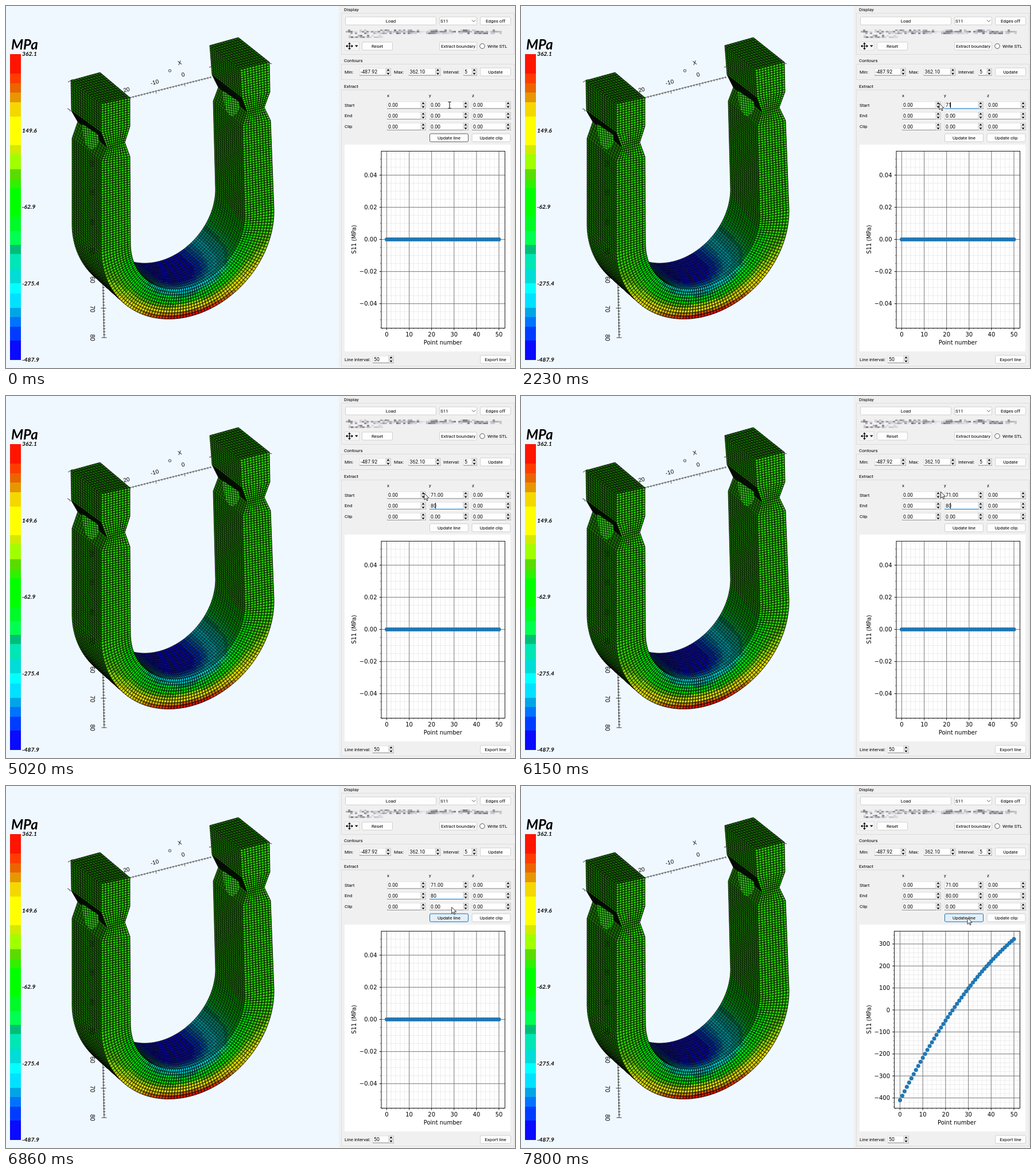
These frames come from a looping animation (887x632 px, 8 s). An HTML page with a canvas:

```html
<!DOCTYPE html>
<html lang="en">
<head>
<meta charset="utf-8">
<title>Stress viewer</title>
<style>
html, body { margin: 0; width: 100%; height: 100%; overflow: hidden; background: #f0f0f0; }
canvas, svg { position: absolute; left: 0; top: 0; width: 887px; height: 632px; }
text { white-space: pre; }
</style>
</head>
<body>
<canvas id="model" width="887" height="632"></canvas>
<svg id="ui" viewBox="0 0 887 632"></svg>
<script>
const LOOP = 8000;
const UI_FONT = 'Roboto, sans-serif';
const PLOT_FONT = '"DejaVu Sans", sans-serif';
const AXIS_FONT = '"Liberation Sans", sans-serif';
const BAR_FONT = 'Lato, sans-serif';

// Colour bar: bottom edge and colour of each band
const BAR_TOP = 84;
const BANDS = [
  [118, '#ff1400'], [135, '#ff3c00'], [151, '#eb6400'], [168, '#e69600'], [193, '#f5d700'],
  [243, '#ffff00'], [259, '#d2eb00'], [285, '#a0ff00'], [302, '#5adc00'], [318, '#32f000'],
  [368, '#00ff00'], [393, '#00fa28'], [417, '#00ff50'], [433, '#00be78'], [459, '#00e6b4'],
  [484, '#00dcd7'], [502, '#00ffff'], [527, '#00e1ff'], [543, '#00a5e6'], [560, '#0073ff'],
  [584, '#003cff'], [618, '#0a0aff']
];

/* ---------- 3D model ---------- */
const ctx = document.getElementById('model').getContext('2d');
const mix = (a, b, k) => a.map((v, i) => v + (b[i] - v) * k);

function stressColor(mpa, shade) {
  const y = BAR_TOP + (362 - mpa) / 850 * 534;
  const hex = (BANDS.find(b => y <= b[0]) || BANDS[BANDS.length - 1])[1];
  const rgb = [1, 3, 5].map(k => Math.round(parseInt(hex.substr(k, 2), 16) * shade));
  return `rgb(${rgb})`;
}

const LEG_ROWS = [12, 7, 6, 38], ARC_ROWS = 88;
const LEG = LEG_ROWS.reduce((a, b) => a + b);
const TOTAL = 2 * LEG + ARC_ROWS;

const divide = (pts, counts) => counts.flatMap((n, s) =>
  Array.from({ length: n }, (_, i) => mix(pts[s], pts[s + 1], i / n)));

// An edge of the U: down the left leg, round the bend, up the right leg
function rail(left, [cx, cy], [ux, uy], [vx, vy], right) {
  const bend = Array.from({ length: ARC_ROWS }, (_, i) => {
    const a = Math.PI * i / ARC_ROWS, c = Math.cos(a), s = Math.sin(a);
    return [cx - ux * c + vx * s, cy - uy * c + vy * s];
  });
  return [...divide(left, LEG_ROWS), ...bend, ...divide(right, [...LEG_ROWS].reverse()), right[4]];
}

function strip(a, b, from, to, cols, stress, shade, line) {
  ctx.strokeStyle = '#000';
  ctx.lineWidth = line;
  for (let i = from; i < to; i++) for (let j = 0; j < cols; j++) {
    const quad = [mix(a[i], b[i], j / cols), mix(a[i], b[i], (j + 1) / cols),
      mix(a[i + 1], b[i + 1], (j + 1) / cols), mix(a[i + 1], b[i + 1], j / cols)];
    ctx.beginPath();
    quad.forEach(p => ctx.lineTo(...p));
    ctx.closePath();
    ctx.fillStyle = stressColor(stress(i, (j + .5) / cols), shade(i));
    ctx.fill();
    ctx.stroke();
  }
}

// Visible wall of the cross hole, cut off by the groove above it
function hole(x, y) {
  ctx.save();
  ctx.translate(x, y);
  ctx.beginPath();
  ctx.moveTo(-14, -22);
  ctx.lineTo(14, -3);
  ctx.quadraticCurveTo(16, 19, 2, 22);
  ctx.quadraticCurveTo(-12, 20, -14, -22);
  ctx.clip();
  ctx.fillStyle = '#2cc014';
  ctx.fillRect(-20, -30, 40, 60);
  ctx.beginPath();
  for (let d = -30; d < 30; d += 4) {
    ctx.moveTo(-20, d - 4); ctx.lineTo(20, d + 4);
    ctx.moveTo(d - 2, -30); ctx.lineTo(d + 2, 30);
  }
  ctx.lineWidth = .8;
  ctx.stroke();
  ctx.restore();
}

function drawModel() {
  ctx.fillStyle = '#f0f8ff';
  ctx.fillRect(0, 0, 581, 632);

  const leftBack = [[113, 130], [114, 183], [125, 202], [115, 231], [115, 383]];
  const rightBack = [[365, 320], [361, 166], [370, 142], [359, 120], [355, 69]];
  const frontOut = rail([[166, 171], [166, 221], [176, 247], [166, 271], [166, 429]],
    [316.5, 392], [150.5, -37], [3, 150],
    [[467, 355], [461, 200], [450, 177], [460, 150], [459, 98]]);
  const frontIn = rail([[216, 160], [216, 210], [207, 238], [216, 263], [217, 415]],
    [316.5, 390], [99.5, -25], [0, 101],
    [[416, 365], [412, 209], [420, 185], [411, 160], [408, 111]]);
  const backOut = rail(leftBack, [265.5, 346], [150.5, -37], [3, 150], rightBack);
  const backIn = rail(leftBack, [265.5, 345], [99.5, -25], [0, 101], rightBack);

  const bend = i => Math.sin(Math.PI * Math.min(1, Math.max(0, (i + .5 - LEG) / ARC_ROWS))) ** 2;
  const side = i => {
    const k = Math.min(i, TOTAL - 1 - i);
    return k >= LEG_ROWS[0] && k < LEG_ROWS[0] + LEG_ROWS[1] ? .08 : .44 + .12 * bend(i);
  };

  strip(backIn, frontIn, LEG + 14, TOTAL, 14,
    (i, d) => -500 * bend(i) * (1 - .4 * d ** 5), side, .65);
  hole(392, 170);
  strip(backOut, frontOut, 0, LEG + 20, 13, () => 0, side, .7);
  hole(147, 228);
  strip(frontOut, frontIn, 0, TOTAL, 10, (i, d) => bend(i) * (365 - 715 * d), () => .83, .9);

  const cap = (a, b, c, d) => strip(divide([a, b, b], [13, 1]), divide([c, d, d], [13, 1]),
    0, 13, 11, () => 0, () => .42, .8);
  cap([113, 130], [166, 171], [164, 116], [216, 160]);
  cap([355, 69], [408, 111], [405, 55], [459, 98]);
}

/* ---------- SVG helpers ---------- */
const rect = (x, y, w, h, fill, extra = '') =>
  `<rect x="${x}" y="${y}" width="${w}" height="${h}" fill="${fill}" ${extra}/>`;
const path = (d, stroke, width = 1, extra = 'fill="none"') =>
  `<path d="${d}" stroke="${stroke}" stroke-width="${width}" ${extra}/>`;
const label = (x, y, str, size = 8, anchor = 'start', font = UI_FONT, extra = '') =>
  `<text x="${x}" y="${y + size * .36}" font-size="${size}" text-anchor="${anchor}" font-family='${font}' ${extra}>${str}</text>`;
const turned = (x, y, angle, str, size, font) =>
  `<g transform="translate(${x} ${y}) rotate(${angle})">${label(0, 0, str, size, 'middle', font)}</g>`;
const button = (x, y, w, str, id = '') =>
  rect(x + .5, y - 7, w, 14, '#fdfdfd', `rx="2" stroke="#d0d0d0" ${id && `id="${id}"`}`) +
  label(x + w / 2 + .5, y, str, 8, 'middle');

function spinBox(x, y, w, value, id = '') {
  const s = x + w - 9;
  return rect(x + .5, y - 6, w - 1, 12, '#fff', 'stroke="#e2e2e2"') +
    path(`M${x} ${y + 6}h${w}`, '#8c8c8c', 1, id && `id="${id}-line"`) +
    rect(s, y - 6, 8, 5.5, '#f4f4f4', 'stroke="#b4b4b4" stroke-width=".7"') +
    rect(s, y + .5, 8, 5.5, '#f4f4f4', 'stroke="#b4b4b4" stroke-width=".7"') +
    `<path d="M${s + 1.5} ${y - 2}l2.5-3 2.5 3zM${s + 1.5} ${y + 2}l2.5 3 2.5-3z"/>` +
    (id && rect(x + 1.5, y - 5, 17.5, 10, '#0078d7', `id="${id}-sel"`)) +
    label(x + 2, y, value, 8.7, 'start', UI_FONT, id && `id="${id}-text"`) +
    (id && path(`M0 ${y - 5}v10`, '#000', 1, `id="${id}-caret"`));
}

const group = (y, bottom, title) =>
  rect(584.5, y + 6.5, 301, bottom - y - 6, 'none', 'stroke="#dcdcdc"') + label(589, y, title);

function legend() {
  let y = BAR_TOP, out = '';
  for (const [end, fill] of BANDS) {
    out += rect(7, y, 19, end - y, fill, 'shape-rendering="crispEdges"');
    y = end;
  }
  const style = 'font-weight="bold" font-style="italic"';
  out += label(9, 67.5, 'MPa', 24, 'start', BAR_FONT, style);
  ['362.1', '149.6', '-62.9', '-275.4', '-487.9'].forEach((s, i) =>
    out += label(28, 83.5 + i * 133.5, s, 10.3, 'start', BAR_FONT, style));
  return out;
}

function axes3d() {
  let top = 'M216 160L358 124', down = 'M169 486L171 579';
  for (let i = 0; i <= 28; i++) {
    const x = 216 + i * 5, y = 160 - i * 1.268;
    top += `M${x} ${y - 1.5}l1 ${i % 10 === 9 ? 6 : 3.5}`;
  }
  for (let i = 0; i <= 18; i++)
    down += `M${(i % 10 ? 169.5 : 166.5) - i * .1} ${579 - i * 5.15}h${i % 10 ? 4 : 9}`;
  let out = path(top, '#333', .8) + path(down, '#222', .9) + path('M455 98l8 3', '#333');
  [[210, 146, '20'], [259, 133, '-10'], [308.5, 119.5, '0'], [302.5, 99, 'X']].forEach(([x, y, s]) =>
    out += turned(x, y, -14, s, 10, AXIS_FONT));
  [[478, '60'], [529, '70'], [579, '80']].forEach(([y, s]) => out += turned(151, y, 90, s, 10.5, AXIS_FONT));
  out += `<g opacity=".5">` + [[275, '20'], [325, '30'], [377, '40'], [428, '50']]
    .map(([y, s]) => turned(150, y, 90, s, 10, AXIS_FONT)).join('') + '</g>';
  out += path('M108 133l8-5M107 179l4 2 1 3M354 107l7-2', '#333');
  return out + '<circle id="probe" cx="285.5" cy="113" r="2.3" fill="#d8dce0" stroke="#555"/>';
}

function plot({ id, left, x0, stepX, zeroY, stepY, ticks, divs, valueY }) {
  const right = 869.5, top = 253.5, bottom = 562.5;
  let minor = '', major = '', marks = '', smallMarks = '', text = '', dots = '';
  for (let k = -1; k <= 26; k++) {
    const x = x0 + k * stepX / 5;
    if (x < left || x > right) continue;
    minor += `M${x} ${top}V${bottom}`;
    smallMarks += `M${x} ${bottom}v2`;
  }
  for (let k = -60; k <= 60; k++) {
    const y = zeroY - k * stepY / divs;
    if (y < top || y > bottom) continue;
    minor += `M${left} ${y}H${right}`;
    smallMarks += `M${left} ${y}h-2`;
  }
  for (let k = 0; k <= 5; k++) {
    const x = x0 + k * stepX;
    major += `M${x} ${top}V${bottom}`;
    marks += `M${x} ${bottom}v3.5`;
    text += label(x, 573, k * 10, 10, 'middle', PLOT_FONT);
  }
  ticks.forEach(([k, s]) => {
    const y = zeroY - k * stepY;
    major += `M${left} ${y}H${right}`;
    marks += `M${left} ${y}h-3.5`;
    text += label(left - 7.5, y, s, 10, 'end', PLOT_FONT);
  });
  for (let n = 0; n <= 50; n++)
    dots += `<circle cx="${x0 + n * stepX / 10}" cy="${valueY(n)}" r="3.5"/>`;
  return `<g id="${id}">` + path(minor, '#e4e4e4', .7) + path(major, '#707070', .9) +
    path(smallMarks, '#000', .5) + path(marks, '#000', .8) + `<g fill="#1f77b4">${dots}</g>` +
    rect(left, top, right - left, bottom - top, 'none', 'stroke="#000" stroke-width=".9"') + text +
    label((left + right) / 2 - .5, 587, 'Point number', 10, 'middle', PLOT_FONT) +
    turned(606, 407.5, -90, 'S11 (MPa)', 10, PLOT_FONT) + '</g>';
}

function hiddenPath() {
  let seed = 7, out = '';
  const rnd = () => (seed = seed * 16807 % 2147483647) / 2147483647;
  const row = (from, to, y, fill) => {
    for (let x = from; x < to; x += 4) {
      const g = 120 + Math.round(rnd() * 115);
      if (rnd() < fill) out += rect(x, y, 4, 2.8, `rgb(${g},${g - 4},${g + 4})`);
    }
  };
  row(592, 862, 41, .4);
  row(592, 862, 43.5, .95);
  row(592, 862, 46.3, .7);
  row(597, 654, 50.5, .3);
  row(597, 654, 53, .9);
  return out;
}

function panel() {
  const columns = [[664, 'x'], [738, 'y'], [812, 'z']];
  const rows = [[173, 'Start'], [191.5, 'End'], [210.5, 'Clip']];
  let out = rect(580, 0, 307, 632, '#f0f0f0') +
    group(6, 84, 'Display') + group(95, 128, 'Contours') + group(140, 628, 'Extract');
  out += button(591, 26, 158, 'Load') + button(755, 26, 65, '') + label(757, 26, 'S11') +
    path('M812 24.5l3 3 3-3', '#555') + button(826, 26, 53, 'Edges off', 'edges') + hiddenPath();
  out += rect(590.5, 62.5, 25, 15, '#f6f6f6', 'stroke="#e0e0e0"') +
    path('M593 70h11M598.5 64.5v11', '#000', 1.2) +
    '<path d="M592 70l3-2.5v5zM605 70l-3-2.5v5zM598.5 63.5l-2.5 3h5zM598.5 76.5l-2.5-3h5zM608 68.5h5.5l-2.75 3.2z"/>';
  out += button(620, 70, 53, 'Reset') + button(755, 70, 65, 'Extract boundary') +
    '<circle cx="830" cy="70" r="4.3" fill="#fff" stroke="#444" stroke-width=".9"/>' + label(839, 70, 'Write STL');
  out += label(590, 115, 'Min:') + spinBox(616, 115, 55, '-487.92') +
    label(676, 115, 'Max:') + spinBox(701.5, 115, 56, '362.10') +
    label(762, 115, 'Interval:') + spinBox(797, 115, 24, '5') + button(826, 115, 53, 'Update');
  columns.forEach(([x, s]) => out += label(x + (s === 'y' ? -1 : 0), 156.5, s));
  rows.forEach(([y, name]) => {
    out += label(590, y, name);
    columns.forEach(([x, s]) => out += spinBox(x, y, 68, '0.00', name + s));
  });
  out += button(738, 230, 67, 'Update line', 'line') + button(811.5, 230, 67, 'Update clip');
  out += rect(590, 242, 289, 361, '#fff');
  out += plot({ id: 'flat', left: 654, x0: 663.5, stepX: 39.1, zeroY: 407.5, stepY: 56.1, divs: 4,
    ticks: [[2, '0.04'], [1, '0.02'], [0, '0.00'], [-1, '−0.02'], [-2, '−0.04']], valueY: () => 407.5 });
  out += plot({ id: 'curve', left: 650.5, x0: 660.5, stepX: 39.7, zeroY: 391, stepY: 38.4, divs: 5,
    ticks: [3, 2, 1, 0, -1, -2, -3, -4].map(k => [k, (k < 0 ? '−' : '') + (k ? Math.abs(k) * 100 : 0)]),
    valueY: n => 391 - (-410 + 20.39 * n - .115 * n * n) * .384 });
  return out + label(590, 617, 'Line interval:') + spinBox(639, 617, 37, '50') +
    button(826, 617, 53, 'Export line');
}

/* ---------- timeline ---------- */
// time, focused field, its text, mode
const FOCUS = [
  [0, '', '', ''], [200, 'Starty', '0.00', 'caret'], [790, 'Starty', '0.00', 'sel'],
  [2030, 'Starty', '7', 'caret'], [2230, 'Starty', '71', 'caret'], [2830, 'Starty', '71', ''],
  [3110, 'Startz', '0.00', 'sel'], [3670, 'Endx', '0.00', 'sel'], [3950, 'Endy', '0.00', 'sel'],
  [4890, 'Endy', '8', 'caret'], [5020, 'Endy', '80', 'caret'], [5680, 'Endy', '80', ''],
  [6150, 'Endy', '80', 'caret'], [6790, 'Endy', '80', ''], [7200, '', '', '']
];
const POINTER = [
  [0, 773, 173], [720, 773, 173], [930, 719, 172], [1130, 719, 171], [1340, 729, 170],
  [5880, 729, 170], [5950, 729, 171], [6150, 731, 168], [6220, 765, 110], [6290, 822, 48],
  [6360, 866, 14], [6430, 816, 57], [6500, 798, 96], [6640, 782, 162], [6930, 775, 227],
  [7200, 778, 230], [LOOP, 778, 230]
];
const BUTTON_LOOK = {
  idle: ['#fdfdfd', '#d0d0d0'], focus: ['#fdfdfd', '#606060'], hover: ['#e3f0fa', '#1a6fb0'],
  soft: ['#eef5fa', '#9dbdd6'], down: ['#cce4f7', '#005499']
};
const LINE = [[0, 'focus'], [200, 'idle'], [6860, 'hover'], [7200, 'down'], [7600, 'hover']];
const EDGES = [[0, 'idle'], [6360, 'hover'], [6430, 'soft'], [6500, 'idle']];
const FADE = 300;

drawModel();
const ui = document.getElementById('ui');
ui.innerHTML = legend() + axes3d() + panel() +
  path('M-2.5-5.5h2l.5.5.5-.5h2M0-5v10M-2.5 5.5h2l.5-.5.5.5h2', '#000', 1, 'id="beam" fill="none"') +
  path('M0 0v11.2l2.6-2.4 1.8 4 1.7-.8-1.8-3.8h3.7z', '#000', .8, 'id="arrow" fill="#fff"');

const $ = id => document.getElementById(id);
const show = (id, on) => $(id).setAttribute('visibility', on ? 'visible' : 'hidden');
const at = (table, t) => table.filter(row => row[0] <= t).pop();
const FIELDS = ['Start', 'End', 'Clip'].flatMap(r => ['x', 'y', 'z'].map(c => r + c));
const LEFT = { x: 666, y: 740, z: 814 };

function pointerAt(t) {
  const i = POINTER.findIndex(p => p[0] > t);
  const a = POINTER[i - 1], b = POINTER[i];
  return mix(a.slice(1), b.slice(1), (t - a[0]) / (b[0] - a[0]));
}

function paintButton(id, look) {
  const [fill, stroke] = BUTTON_LOOK[look];
  $(id).setAttribute('fill', fill);
  $(id).setAttribute('stroke', stroke);
}

function render(t) {
  const [, focus, typed, mode] = at(FOCUS, t);
  const focusedAt = FOCUS.find(row => row[1] === focus)[0];
  const glow = mix([140, 140, 140], [0, 120, 215], Math.min(1, (t - focusedAt) / FADE));
  const settled = { Starty: t >= 3110 ? '71.00' : '0.00', Endy: t >= 7200 ? '80.00' : '0.00' };
  for (const id of FIELDS) {
    const active = id === focus, selected = active && mode === 'sel';
    const text = active ? typed : settled[id] || '0.00';
    $(id + '-text').textContent = text;
    $(id + '-text').setAttribute('fill', selected ? '#fff' : '#000');
    $(id + '-line').setAttribute('stroke', active ? `rgb(${glow})` : '#8c8c8c');
    show(id + '-sel', selected);
    show(id + '-caret', active && mode === 'caret');
    const x = LEFT[id.slice(-1)] + (text === '0.00' ? 17.5 : text.length * 4.6);
    $(id + '-caret').setAttribute('transform', `translate(${Math.floor(x) - .5} 0)`);
  }
  paintButton('line', at(LINE, t)[1]);
  paintButton('edges', at(EDGES, t)[1]);
  show('probe', t < 7530);
  show('flat', t < 7600);
  show('curve', t >= 7600);
  const [x, y] = pointerAt(t);
  for (const id of ['beam', 'arrow']) $(id).setAttribute('transform', `translate(${x} ${y})`);
  show('beam', t < 1130);
  show('arrow', t >= 1130);
}

function tick() {
  render(performance.now() % LOOP);
  requestAnimationFrame(tick);
}
tick();
</script>
</body>
</html>
```
